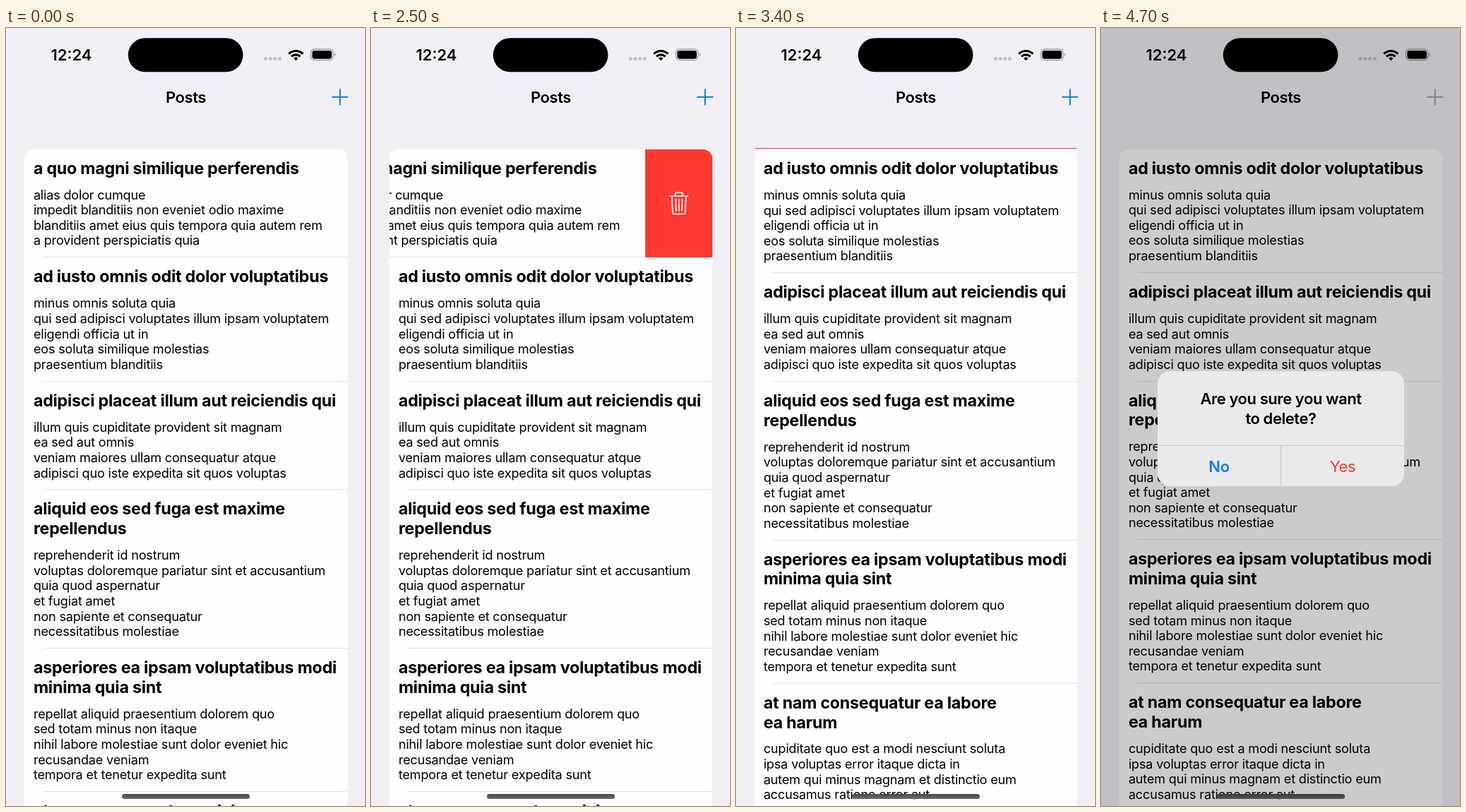
An HTML page that plays this animation: 508 px wide and 1102 px high, repeating every 5300 ms.

```html
<!DOCTYPE html>
<html lang="en">
<head>
<meta charset="utf-8">
<title>Posts</title>
<style>
  html, body { margin: 0; width: 100%; height: 100%; overflow: hidden; }
  body {
    position: relative; background: #f2f0f6; color: #000;
    font: 600 22px/28.4px Inter, "Noto Sans", sans-serif;
    font-optical-sizing: none; letter-spacing: -.02em;
  }
  body > *, #red, #trash, #alert > * { position: absolute; }
  svg { left: 0; top: 0; overflow: visible; fill: none; stroke-linecap: round; stroke-linejoin: round; }
  .mid { width: 160px; text-align: center; transform: translate(-50%, -50%); white-space: nowrap; }
  #first, #rest { left: 26px; width: 457px; overflow: hidden; }
  #first { top: 171.5px; border-radius: 13px 13px 0 0; }
  .row {
    position: relative; box-sizing: border-box; padding: 13.2px 12.9px;
    background: #fefdff; white-space: pre;
  }
  .row::after {
    content: ""; position: absolute; left: 26px; right: 0; bottom: 0;
    height: 1px; background: var(--line, #e1dfe4);
  }
  h2 { margin: 0 0 13.2px; font: 700 23.27px/27.76px Inter, "Noto Sans", sans-serif; letter-spacing: -.0108em; }
  p { margin: 0; font: 400 18.1px/21.6px Inter, "Noto Sans", sans-serif; letter-spacing: -.011em; }
  #red { top: 0; right: 0; height: 153.8px; background: #ff3a30; }
  #edge { left: 27px; top: 170px; width: 455px; height: 1px; background: #ff3a30; }
  #home {
    left: 164px; top: 1085px; width: 181px; height: 6.5px; border-radius: 4px;
    background: linear-gradient(#474648, #6c6b6e);
  }
  #dim { inset: 0; background: #000; }
  #alert { left: 80px; top: 486px; width: 349px; height: 163px; border-radius: 18px; background: #eae9ec; }
  #alert i { background: #c9c8cc; }
</style>
</head>
<body>
<div id="first"></div>
<div id="rest"></div>
<div id="edge"></div>

<svg width="508" height="120">
  <rect x="172.8" y="14.2" width="162.6" height="48.1" rx="24" fill="#000"/>
  <path d="M367.3 43.5h.01M374 43.5h.01M380.7 43.5h.01M387.4 43.5h.01" stroke="#c3c1c8" stroke-width="5"/>
  <g stroke="#000" stroke-width="3.1" stroke-linecap="butt">
    <path d="M400.2 36.6a14.2 14.2 0 0 1 20 0"/>
    <path d="M403.9 40.4a9 9 0 0 1 12.6 0"/>
  </g>
  <path d="M410.2 46.2l-3.3-3.4a4.8 4.8 0 0 1 6.6 0z" fill="#000"/>
  <rect x="431.4" y="30" width="31.4" height="15.6" rx="5" stroke="#9c9aa0" stroke-width="1.3"/>
  <rect x="433.3" y="31.9" width="27.6" height="11.8" rx="3.4" fill="#000"/>
  <path d="M464.6 35.3q1.8 .6 1.8 2.5t-1.8 2.5z" fill="#a3a1a7"/>
  <path id="plus" d="M462 97.8h21.4M472.7 87.1v21.4" stroke-width="2"/>
</svg>
<div class="mid" style="left:92.5px;top:38px;letter-spacing:0">12:24</div>
<div class="mid" style="left:254.5px;top:98px">Posts</div>
<div id="home"></div>
<div id="dim"></div>

<div id="alert">
  <div class="mid" style="left:174.5px;top:52.5px;width:300px">Are you sure you want<br>to delete?</div>
  <i style="left:0;top:105px;width:349px;height:1px"></i>
  <i style="left:174px;top:105px;width:1px;height:58px"></i>
  <div class="mid" style="left:87px;top:135px;color:#0a7aff">No</div>
  <div class="mid" style="left:262px;top:135px;color:#ea3b33;font-weight:400">Yes</div>
</div>

<script>
const $ = id => document.getElementById(id);

const posts = [
  ["a quo magni similique perferendis",
   "alias dolor cumque\nimpedit blanditiis non eveniet odio maxime\nblanditiis amet eius quis tempora quia autem rem\na provident perspiciatis quia"],
  ["ad iusto omnis odit dolor voluptatibus",
   "minus omnis soluta quia\nqui sed adipisci voluptates illum ipsam voluptatem\neligendi officia ut in\neos soluta similique molestias\npraesentium blanditiis"],
  ["adipisci placeat illum aut reiciendis qui",
   "illum quis cupiditate provident sit magnam\nea sed aut omnis\nveniam maiores ullam consequatur atque\nadipisci quo iste expedita sit quos voluptas"],
  ["aliquid eos sed fuga est maxime\nrepellendus",
   "reprehenderit id nostrum\nvoluptas doloremque pariatur sint et accusantium\nquia quod aspernatur\net fugiat amet\nnon sapiente et consequatur\nnecessitatibus molestiae"],
  ["asperiores ea ipsam voluptatibus modi\nminima quia sint",
   "repellat aliquid praesentium dolorem quo\nsed totam minus non itaque\nnihil labore molestiae sunt dolor eveniet hic\nrecusandae veniam\ntempora et tenetur expedita sunt"],
  ["at nam consequatur ea labore\nea harum",
   "cupiditate quo est a modi nesciunt soluta\nipsa voluptas error itaque dicta in\nautem qui minus magnam et distinctio eum\naccusamus ratione error aut"]
];
const rows = posts.map(([title, body]) => `<div class="row"><h2>${title}</h2><p>${body}</p></div>`);

$("first").innerHTML = rows[0] + `<div id="red"><svg id="trash" width="28" height="34"
  stroke="#fff" stroke-width="1.7"><path d="M1 6h25.5M8.7 6V3.5q0-2.3 2.3-2.3h5.5q2.3 0 2.3 2.3V6M3.6 6l1.3 22.5
  q.2 3 3 3h11.7q2.8 0 3-3L23.9 6M9 10.5l.6 16.5M13.75 10.5V27M18.5 10.5L17.9 27"/></svg></div>`;
$("rest").innerHTML = rows.slice(1).join("");

const swiped = $("first").firstChild, next = $("rest").firstChild;
const TOP = 171.5, ROW = 153.8, OPEN = 95.3, WIDTH = 457;
const clamp = v => Math.max(0, Math.min(1, v));
const mix = (a, b, k) => a + (b - a) * k;

// Critically damped spring: 0 at the start time, settling at 1
function spring(t, start, w) {
  const x = Math.max(0, t - start) / 1000 * w;
  return 1 - (1 + x) * Math.exp(-x);
}

function draw(t) {
  const open = OPEN * spring(t, 1798, 12.5);
  const gone = t < 3600 ? spring(t, 2736, 12.5) : 1;
  const left = ROW * (1 - gone);
  const red = mix(open, WIDTH, gone);

  $("first").style.height = left + "px";
  $("rest").style.top = TOP + left + "px";
  $("rest").style.borderRadius = gone ? "13px 13px 0 0" : "0";
  swiped.style.transform = `translateX(${-red}px)`;
  swiped.style.opacity = 1 - gone;
  $("red").style.width = red + "px";
  $("edge").style.opacity = gone > 0 && t < 3500 ? 1 : 0;
  $("trash").style.left = Math.min(red, OPEN) / 2 - 13.75 + "px";
  $("trash").style.top = "60px";
  $("trash").style.opacity = clamp((red - 50) / 35);

  const pressed = t < 3900 ? 0 : clamp((4250 - t) / 100);
  next.style.background = `rgb(${mix(254, 209, pressed)},${mix(253, 207, pressed)},${mix(255, 212, pressed)})`;
  next.style.setProperty("--line", pressed ? "transparent" : "#e1dfe4");

  const shown = spring(t, 4245, 22.85);
  $("dim").style.opacity = .2 * shown;
  $("alert").style.opacity = shown;
  $("alert").style.transform = `scale(${mix(1.2, 1, shown)})`;
  $("plus").style.stroke = `rgb(${mix(10, 162, shown)},${mix(122, 160, shown)},${mix(224, 166, shown)})`;
}

// The screen refreshes ten times a second
const begin = performance.now();
function tick() {
  const t = (performance.now() - begin) % 5300;
  draw(Math.floor(t / 100) * 100);
  requestAnimationFrame(tick);
}
tick();
</script>
</body>
</html>
```
